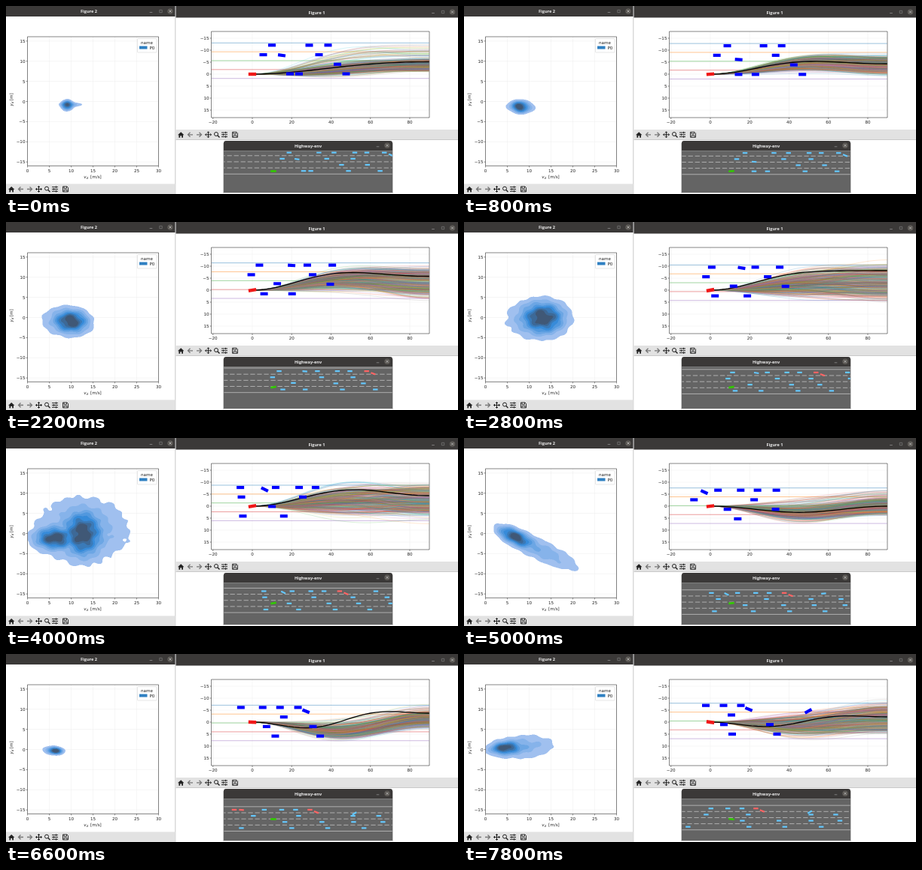
These frames come from a looping animation (600x251 px, 8000 ms). An HTML page with a canvas:

```html
<!DOCTYPE html>
<html lang="en">
<head>
<meta charset="utf-8">
<title>Traffic planner</title>
<style>
  html, body { margin: 0; width: 100%; height: 100%; overflow: hidden; background: #fff; }
  svg, canvas { position: absolute; left: 0; top: 0; width: 600px; height: 251px; }
  text { font: 5.6px "DejaVu Sans", sans-serif; fill: #222; }
  .title { font: bold 5.6px "Open Sans", sans-serif; fill: #eee; text-anchor: middle; }
  .mid { text-anchor: middle; }
  .end { text-anchor: end; }
  .grid { stroke: #ececec; stroke-width: .5; }
  .tick { stroke: #222; stroke-width: .5; }
  .axes { fill: none; stroke: #333; stroke-width: .6; }
</style>
</head>
<body>
<svg viewBox="0 0 600 251">
  <defs>
    <g id="tools" fill="none" stroke="#222">
      <path d="M3 .5 7.2-3.5 11.4.5H10V4H8.2V1.4H6.2V4H4.4V.5Z" fill="#222" stroke="none"/>
      <path d="M23 0H16.500M19.500-3 16.500 0 19.500 3M28 0H34.500M31.500-3 34.500 0 31.500 3" stroke="#777" stroke-width="1.3"/>
      <path d="M39.500 0H47.500M43.500-4V4M41 -1.500 39.500 0 41 1.500M46-1.500 47.500 0 46 1.500M42-2.500 43.500-4 45-2.500M42 2.500 43.500 4 45 2.500"/>
      <circle cx="54" cy="-.8" r="2.500"/><path d="M55.800 1 58.500 3.800" stroke-width="1.400"/>
      <path d="M61-2.800H69M61 0H69M61 2.800H69M66.500-4V-1.600M63.500-1.200V1.200M66.500 1.600V4"/>
      <path d="M75.500-3.500H81L82.500-2V3.500H75.500ZM77-3.500V-1H80.500V-3.500M77 3.500V1H81V3.500" stroke-width=".9"/>
    </g>
    <g id="close" fill="none" stroke="#ccc" stroke-width=".7">
      <circle r="3.800" fill="#5c5955" stroke="none"/><path d="M-1.500-1.500 1.500 1.500M1.500-1.500-1.500 1.500"/>
    </g>
    <path id="shrink" d="M-1.800 1.500H1.800" stroke="#999" stroke-width=".7"/>
    <path id="grow" d="M-1.700-1.700H1.700V1.700H-1.700Z" fill="none" stroke="#888" stroke-width=".6"/>
  </defs>

  <path d="M224.800 0V251M225.500 178.500H600M288.500 183V249.500H513.500V183" fill="none" stroke="#bbb" stroke-width=".8"/>
  <path d="M0 0H224.500V14H0ZM225.500 0H600V15.500H225.500ZM289 183Q289 180 292 180H510Q513 180 513 183V193.500H289Z" fill="#3b3938"/>
  <path d="M0 237.500H224.500V251H0ZM225.500 165H600V178H225.500Z" fill="#e2e2e2"/>
  <path d="M289 193.500H513V249H289Z" fill="#646464"/>
  <text class="title" x="110" y="9">Figure 2</text>
  <text class="title" x="412.500" y="10.700">Figure 1</text>
  <text class="title" x="401" y="188.500">Highway-env</text>
  <use href="#close" x="218" y="7"/><use href="#grow" x="205.500" y="7"/><use href="#shrink" x="192.500" y="7"/>
  <use href="#close" x="592.500" y="8"/><use href="#grow" x="580" y="8"/><use href="#shrink" x="567" y="8"/>
  <use href="#close" x="506" y="186.300"/><use href="#shrink" x="493.500" y="186.300"/>
  <use href="#tools" y="244.500"/><use href="#tools" x="225" y="171.800"/>

  <g id="ticks"></g>
  <path class="axes" d="M28.500 41H202.500V213.500H28.500ZM272.500 34H562V149H272.500Z"/>
  <text class="mid" x="115" y="229.500"><tspan font-style="italic">v</tspan><tspan font-style="italic" font-size="4" dy="1">d</tspan><tspan dy="-1" dx="3">[m/s]</tspan></text>
  <text class="mid" transform="translate(9 125) rotate(-90)"><tspan font-style="italic">y</tspan><tspan font-style="italic" font-size="4" dy="1">d</tspan><tspan dy="-1" dx="1.500">[m]</tspan></text>
  <rect x="174.500" y="43.500" width="25.500" height="18.500" rx="1" fill="#fff" stroke="#ccc" stroke-width=".5"/>
  <text class="mid" x="187" y="50.500">name</text>
  <rect x="177" y="53.500" width="10.500" height="4" fill="#2f80c2"/>
  <text x="190.500" y="57.700">P0</text>
</svg>
<canvas id="stage"></canvas>

<script>
const LOOP = 8000, STEP = 200, LAST = LOOP - STEP;
const EGO = { x: 327, y: 91, viewX: 355, viewY: 220.5 };
const LANE = 12.75, VIEW_X = 0.8, VIEW_Y = 0.64;
const TAB10 = ['#1f77b4', '#ff7f0e', '#2ca02c', '#d62728', '#9467bd',
               '#8c564b', '#e377c2', '#7f7f7f', '#bcbd22', '#17becf'];
const LEFT = { l: 28.5, r: 202.5, t: 41, b: 213.5 };
const RIGHT = { l: 272.5, r: 562, t: 34, b: 149 };
const ROAD = { l: 289, r: 513, t: 193.5, b: 249 };

const mix = (a, b, k) => Array.isArray(a) ? a.map((v, i) => mix(v, b[i], k)) : a + (b - a) * k;
const bell = (p, center) => Math.exp(-(((p - center) / .2) ** 2));

// Axis ticks and labels
const label = n => String(n).replace('-', '\u2212');
const line = (x1, y1, x2, y2, cls) => `<path class="${cls}" d="M${x1} ${y1}L${x2} ${y2}"/>`;
function axis(from, to, by, place, box, vertical) {
  let out = '';
  for (let n = from; n <= to; n += by) {
    const p = place(n);
    out += vertical
      ? line(box.l, p, box.r, p, 'grid') + line(box.l - 2, p, box.l, p, 'tick')
        + `<text class="end" x="${box.l - 3}" y="${p + 2}">${label(n)}</text>`
      : line(p, box.t, p, box.b, 'grid') + line(p, box.b, p, box.b + 2, 'tick')
        + `<text class="mid" x="${p}" y="${box.b + 8.3}">${label(n)}</text>`;
  }
  return out;
}
document.getElementById('ticks').innerHTML =
  axis(0, 30, 5, n => LEFT.l + n * 5.8, LEFT) +
  axis(-15, 15, 5, n => 127.5 - n * 5.38, LEFT, true) +
  axis(-20, 80, 20, n => EGO.x + n * 2.612, RIGHT) +
  axis(-15, 15, 5, n => EGO.y + n * 3.2, RIGHT, true);

// Key moments. plan, fan: wave heights of the chosen path and of the bundle's middle;
// spread: how far bundle waves vary; lift: pull on stray paths.
// core, twin, halo: centre and radii of the density's parts.
const moments = [
  { time: 0, plan: [-16.5, -1.5, 0], fan: [-12, -.5], spread: [8, 5], lift: -22,
    core: [81, 132.5, 3.9, 3.5], halo: [87, 131.5, 9, 2], tilt: 0 },
  { time: 1600, plan: [-9, -17.5, -2], fan: [-11, -14], spread: [16, 4], lift: 12,
    core: [68, 137, 8, 4.5], halo: [64, 137, 15, 8], tilt: 8 },
  { time: 2800, plan: [-24, -10, -2], fan: [-10, -3], spread: [24, 8], lift: 0,
    core: [105, 128, 14, 10.5], halo: [98, 129, 27, 17], tilt: 0 },
  { time: 4000, plan: [-14, -14, 0], fan: [-8, -4], spread: [21, 11], lift: 12,
    core: [102, 128, 12, 15], twin: [65, 134, 14, 7.5], halo: [102, 123, 40, 28], tilt: 0 },
  { time: 5000, plan: [0, 8.3, 0], fan: [0, 9.5], spread: [11, 6], lift: -18,
    core: [68, 132, 12, 5], halo: [100, 149, 36, 9], tilt: 26 },
  { time: 6600, plan: [-21, 5, 9], fan: [-3.5, 15], spread: [10, 6], lift: -14,
    core: [65, 129, 5, 2.5], halo: [63, 129, 9, 3.6], tilt: 4 },
  { time: LAST, plan: [-13, 4, 6], fan: [-5, 6], spread: [20, 8], lift: 0,
    core: [55, 125.5, 10, 4.3], halo: [76, 124, 27, 10], tilt: -4 }
].map(m => ({ twin: m.core, ...m }));

function poseAt(time) {
  let i = 0;
  while (i < moments.length - 2 && time >= moments[i + 1].time) i++;
  const a = moments[i], b = moments[i + 1], k = (time - a.time) / (b.time - a.time);
  const p = time / LAST, turn = Math.PI * p / .8;
  const pose = { p, lane: 52.3 + 9.6 * (1 - Math.cos(turn)), yaw: -11 * Math.sin(turn) };
  for (const key in a) pose[key] = mix(a[key], b[key], k);
  return pose;
}

// Cars move from one plot x to another at a pace; veer is [when, lanes, degrees].
const steady = p => p;
const late = p => p ** 1.55;
const settle = p => Math.sin(p * Math.PI / 2) ** 1.5;
const glide = p => p - .11 * Math.sin(2 * Math.PI * p) * (1 - p);
const cars = [];
function car(lane, from, to, pace, { veer = [0, 0, 0], yaw = 0, crash = 9 } = {}) {
  const x = p => mix(from, to, pace(p));
  cars.push(p => {
    const swing = bell(p, veer[0]);
    return { x: x(p), lane: lane + veer[1] * swing, yaw: yaw + veer[2] * swing, crashed: p >= crash };
  });
  return x;
}
car(0, 353, 235, late, { crash: .84 });
car(0, 402.5, 236, late, { crash: .84, veer: [.57, .22, 28] });
car(0, 427.5, 293, glide);
car(0, 462, 321, glide);
car(0, 482, 344.5, glide);
const wreckX = car(0, 511, 367.5, glide, { crash: .2 });
car(.4, 522, 378, glide, { crash: .2, yaw: 22 });
car(0, 560, 457, settle, { veer: [.92, .7, -34] });
car(1, 341.5, 285, steady);
car(1, 415.5, 355, late);
car(1, 459, 459, steady);
car(1, 540, 500, settle);
car(2, 366, 345, settle, { veer: [-.05, -1, 8] });
car(2, 440, 406, settle);
car(2, 483, 459, settle);
car(2, 545, 507, settle);
car(3, 377, 255, steady);
car(3, 389, 356, settle);
car(3, 451.5, 415.5, settle);
car(3, 504, 476, settle);

const canvas = document.getElementById('stage');
const ctx = canvas.getContext('2d');
const ratio = Math.max(1, window.devicePixelRatio || 1);
canvas.width = 600 * ratio;
canvas.height = 251 * ratio;
ctx.scale(ratio, ratio);

function randomFrom(seed) {
  return () => {
    seed = (seed + 0x6d2b79f5) | 0;
    let n = Math.imul(seed ^ seed >>> 15, 1 | seed);
    n = n + Math.imul(n ^ n >>> 7, 61 | n) ^ n;
    return ((n ^ n >>> 14) >>> 0) / 4294967296;
  };
}

function clipped({ l, t, r, b }, paint) {
  ctx.save();
  ctx.beginPath();
  ctx.rect(l + .3, t + .3, r - l - .6, b - t - .6);
  ctx.clip();
  paint();
  ctx.restore();
}

function box(x, y, w, h, yaw, fill) {
  ctx.save();
  ctx.translate(x, y);
  ctx.rotate(yaw * Math.PI / 180);
  ctx.fillStyle = fill;
  ctx.fillRect(-w / 2, -h / 2, w, h);
  ctx.restore();
}

function stroke(points, color, width, alpha = 1) {
  ctx.beginPath();
  points.forEach(([x, y]) => ctx.lineTo(x, y));
  ctx.strokeStyle = color;
  ctx.lineWidth = width;
  ctx.globalAlpha = alpha;
  ctx.stroke();
  ctx.globalAlpha = 1;
}

// Density field in flat shades, painted at twice the plot size
const DENSE = 2, LEVELS = 8;
const levelAt = i => .06 + .07 * i + .0065 * i * i;
const light = [160, 192, 239], middle = [55, 139, 217], dark = [64, 88, 118];
const shade = i => i < 4 ? mix(light, middle, i / 4) : mix(middle, dark, (i - 4) / 3);
const sheet = document.createElement('canvas');
sheet.width = (LEFT.r - LEFT.l) * DENSE;
sheet.height = (LEFT.b - LEFT.t) * DENSE;
const sheetCtx = sheet.getContext('2d');

function drawDensity({ core, twin, halo, tilt }) {
  const image = sheetCtx.createImageData(sheet.width, sheet.height);
  const cos = Math.cos(tilt * Math.PI / 180), sin = Math.sin(tilt * Math.PI / 180);
  const hill = ([cx, cy, rx, ry], x, y) => {
    const dx = x - cx, dy = y - cy;
    return Math.exp(-(((dx * cos + dy * sin) / rx) ** 2 + ((dy * cos - dx * sin) / ry) ** 2) / 2);
  };
  for (let j = 0, o = 0; j < sheet.height; j++) {
    const y = LEFT.t + (j + .5) / DENSE;
    for (let i = 0; i < sheet.width; i++, o += 4) {
      const x = LEFT.l + (i + .5) / DENSE;
      const ripple = 1 + .2 * Math.sin(x * .25 + y * .12) * Math.sin(y * .3 - x * .09);
      const height = ripple * (Math.max(hill(core, x, y), hill(twin, x, y)) + .2 * hill(halo, x, y));
      let level = -1;
      while (level < LEVELS - 1 && height > levelAt(level + 1)) level++;
      if (level >= 0) {
        image.data.set(shade(level), o);
        image.data[o + 3] = 255;
      }
    }
  }
  sheetCtx.putImageData(image, 0, 0);
  ctx.drawImage(sheet, LEFT.l, LEFT.t, LEFT.r - LEFT.l, LEFT.b - LEFT.t);
}

// A path is a sum of cosine waves that leaves the ego car level
const POINTS = 30;
const wave = (n, s) => (1 - Math.cos(n * Math.PI * s)) / 2;
const pathOf = heights => Array.from({ length: POINTS + 1 }, (_, i) => {
  const s = i / POINTS;
  return [mix(EGO.x, RIGHT.r, s), heights.reduce((y, h, n) => y + h * wave(n + 1, s), EGO.y)];
});

function drawPaths({ plan, fan, spread, lift }, seed) {
  const random = randomFrom(seed);
  const normal = () => (random() + random() + random() + random() - 2) * 1.7;
  for (let i = 0; i < 420; i++) {
    const side = Math.floor(random() * 3) - 1;
    const stray = random() < .13 ? lift * random() : 0;
    const end = fan[0] + spread[0] * (.55 * side + .24 * normal()) + stray;
    const bend = fan[1] + spread[1] * .6 * normal() + stray * .5;
    stroke(pathOf([end, bend, normal()]), TAB10[i % 10], .5, .36);
  }
  stroke(pathOf(plan), '#000', 1.3);
}

function drawPlot(pose, traffic, seed) {
  for (let i = 0; i < 5; i++) {
    const y = pose.lane - 3 + 11.85 * i;
    stroke([[RIGHT.l, y], [RIGHT.r, y]], TAB10[i], .7, .65);
  }
  drawPaths(pose, seed);
  traffic.filter(c => c.x > 303)
    .sort((a, b) => Math.abs(a.x - EGO.x) - Math.abs(b.x - EGO.x))
    .slice(0, 10)
    .forEach(c => box(c.x, c.y, 10, 4.2, c.yaw, '#00f'));
  box(EGO.x, EGO.y, 10.4, 4.4, pose.yaw, '#f01818');
}

function drawRoad(pose, traffic) {
  const viewX = x => EGO.viewX + (x - EGO.x) * VIEW_X;
  const viewY = y => EGO.viewY + (y - EGO.y) * VIEW_Y;
  for (let i = 0; i < 5; i++) {
    const y = viewY(pose.lane + (i - .5) * LANE);
    ctx.setLineDash(i % 4 ? [6.3, 2.75] : []);
    ctx.lineDashOffset = -(viewX(wreckX(pose.p)) % 9.05);
    stroke([[280, y], [ROAD.r, y]], '#d0d0d0', .7);
  }
  ctx.setLineDash([]);
  for (const c of traffic) {
    box(viewX(c.x), viewY(c.y), 6.4, 2.2, c.yaw, c.crashed ? '#ff6464' : '#64c8ff');
  }
  box(EGO.viewX, EGO.viewY, 7.4, 2.7, pose.yaw, '#32c800');
}

function draw(step) {
  const pose = poseAt(step * STEP);
  const traffic = cars.map(at => at(pose.p)).map(c => ({ ...c, y: pose.lane + c.lane * LANE }));
  ctx.clearRect(0, 0, 600, 251);
  clipped(LEFT, () => drawDensity(pose));
  clipped(RIGHT, () => drawPlot(pose, traffic, step * 977 + 5));
  clipped(ROAD, () => drawRoad(pose, traffic));
}

const start = performance.now();
let shown = -1;
function tick() {
  const step = Math.floor((performance.now() - start) % LOOP / STEP);
  if (step !== shown) draw(shown = step);
  requestAnimationFrame(tick);
}
tick();
</script>
</body>
</html>
```
